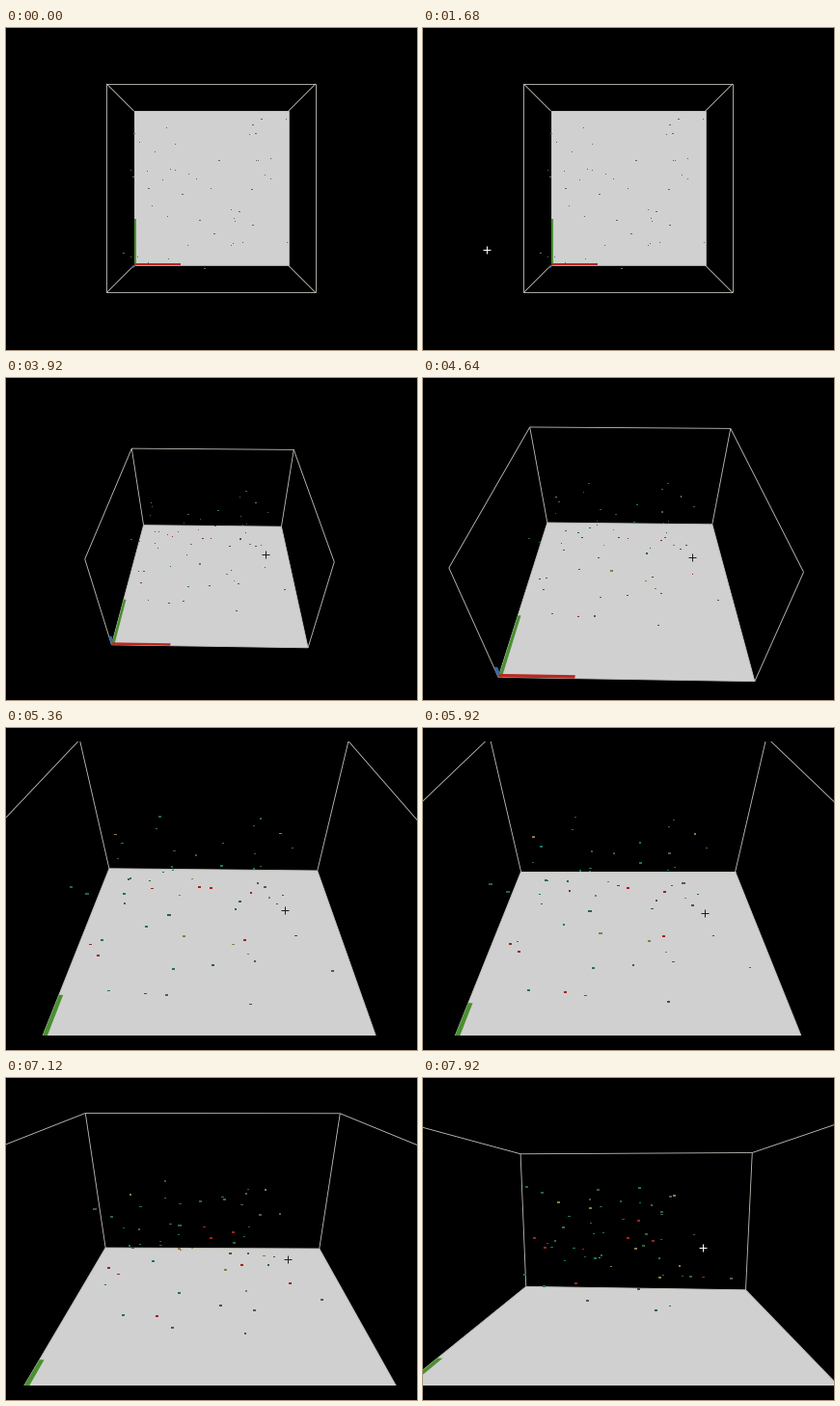
A matplotlib script for the animation above (8000 ms loop, 426 by 334 pixels).

```python
import itertools
import numpy as np
import matplotlib.pyplot as plt
from matplotlib.animation import FuncAnimation
from matplotlib.collections import LineCollection, PolyCollection

W, H = 426, 334
TOP, BOTTOM = 14.3, 319
CX, CY = 212.6, 166.2
FRAMES, STEP = 100, 80
FOCAL = 152.5 / np.tan(np.radians(22.5))
BOX = np.array([1, 1, 0.6])
LID = (2, 1)
DPI = 64
PX = 72 / DPI
COUNT = 56
DRAG_START = 1680

rng = np.random.default_rng(11)
CLOUD = rng.uniform(-.92, .92, (COUNT, 3)) * BOX
DRIFT = rng.normal(0, .06, (COUNT, 3))
HUES = np.array([(.16, .4, .22), (.1, .45, .42), (.6, .15, .12),
                 (.3, .36, .36), (.55, .48, .28)])
COLORS = HUES[rng.integers(len(HUES), size=COUNT)]


def ramp(t, start, end):
    return float(np.clip((t - start) / (end - start), 0, 1))


class Moves:
    """Progress of each hand movement at time t."""
    def __init__(self, t):
        self.lift = ramp(t, 1760, 3360)
        self.sweep = ramp(t, 3520, 3920)
        self.zoom = ramp(t, 3960, 5440)
        self.settle = ramp(t, 5360, 6480)
        self.lower = ramp(t, 6640, 7920)

    def tilt(self):
        return np.radians(50.2 * self.lift + 2.4 * self.settle
                          + 29.4 * self.lower)

    def yaw(self):
        swing = .017 * self.lift - .04 * np.sin(np.pi * self.lift)
        return swing - .034 * self.settle + .071 * self.lower

    def distance(self):
        return 4 - 1.84 * self.zoom

    def pointer(self):
        x = (66 + 6 * self.lift + 197 * self.sweep + 21 * self.zoom
             + 3 * self.settle - 3 * self.lower)
        y = (231 - 50 * self.lift + 3 * self.sweep + 6 * self.zoom
             + 6 * self.settle - 19 * self.lower)
        return round(x) + .5, round(y) - .5


class Camera:
    def __init__(self, moves):
        a, b = moves.tilt(), moves.yaw()
        self.dist = moves.distance()
        sa, ca, sb, cb = np.sin(a), np.cos(a), np.sin(b), np.cos(b)
        self.right = np.array([cb, sb, 0])
        self.up = np.array([-ca * sb, ca * cb, sa])
        self.back = np.array([sa * sb, -sa * cb, ca])
        self.pos = self.back * self.dist

    def scale(self, pts):
        return FOCAL / (self.dist - np.asarray(pts) @ self.back)

    def project(self, pts):
        pts = np.asarray(pts, float)
        s = self.scale(pts)
        return np.column_stack([CX + pts @ self.right * s,
                                CY - pts @ self.up * s])

    def inside(self, face):
        axis, sign = face
        return face != LID and sign * self.pos[axis] < BOX[axis]


def box_edges():
    """Yield both ends of an edge and the two faces (axis, sign) it joins."""
    for axis in range(3):
        u, v = [i for i in range(3) if i != axis]
        for su, sv in itertools.product((-1, 1), repeat=2):
            ends = np.zeros((2, 3))
            ends[:, axis] = -1, 1
            ends[:, u], ends[:, v] = su, sv
            yield ends * BOX, ((u, su), (v, sv))


def strip(axis, length, side, width=.028):
    """Flat bar from the box corner along one axis."""
    along, across = np.eye(3)[axis] * length, np.eye(3)[side] * width
    return -BOX + np.array([0 * along, along, along + across, across])


EDGES = list(box_edges())
FLOOR = strip(0, 2, 1, 2)
BARS = [(strip(2, .15, 0), "#3465a4"), (strip(1, .6, 0), "#4a9030"),
        (strip(0, .6, 1), "#b82820")]

fig = plt.figure(figsize=(W / DPI, H / DPI), dpi=DPI, facecolor="black")
ax = fig.add_axes([0, (H - BOTTOM) / H, 1, (BOTTOM - TOP) / H])
ax.set(xlim=(0, W), ylim=(BOTTOM, TOP))
ax.axis("off")

floor = ax.add_patch(plt.Polygon(FLOOR[:, :2], fc="#d0d0d0", lw=0, zorder=1))
frame_lines = ax.add_collection(
    LineCollection([], colors="#c4c4bc", linewidths=.85 * PX, zorder=2))
bars = ax.add_collection(
    PolyCollection([], fc=[c for _, c in BARS], lw=0, zorder=3))
dots = ax.add_collection(PolyCollection([], lw=0, zorder=4))
cursor = ax.add_collection(
    LineCollection([], linewidths=PX, snap=False, zorder=6))


def slabs(cam, pts):
    """Small flat quads around the given points."""
    scale = cam.scale(pts)
    w = np.maximum(.0075 * scale, .55)
    h = np.maximum(.0045 * scale, .45)
    signs = np.array([(-1, -1), (1, -1), (1, 1), (-1, 1)])
    return (cam.project(pts)[:, None]
            + signs * np.column_stack([w, h])[:, None])


def draw_cloud(cam, t):
    p = ramp(t, DRAG_START, 7920)
    fade = ramp(t, DRAG_START, 4700)
    pts = np.vstack([CLOUD * (1 - .45 * p) + DRIFT * p, np.zeros(3)])
    tint = np.vstack([COLORS, (.75, .08, .12)])
    dots.set_verts(slabs(cam, pts))
    dots.set_facecolor(tint * fade + .4 * (1 - fade))


def draw_cursor(t, moves):
    if t < DRAG_START:
        cursor.set_segments([])
        return
    x, y = moves.pointer()
    cursor.set_segments([[(x - 4, y), (x + 4, y)], [(x, y - 4), (x, y + 4)]])
    over = floor.get_path().contains_point((x, y))
    cursor.set_color("#202020" if over else "white")


def draw(k):
    t = k * STEP
    moves = Moves(t)
    cam = Camera(moves)
    floor.set_xy(cam.project(FLOOR))
    # an edge shows only if one of its faces is seen from inside
    frame_lines.set_segments([cam.project(ends) for ends, faces in EDGES
                              if any(map(cam.inside, faces))])
    bars.set_verts([cam.project(quad) for quad, _ in BARS])
    draw_cloud(cam, t)
    draw_cursor(t, moves)
    return floor, frame_lines, bars, dots, cursor


anim = FuncAnimation(fig, draw, frames=FRAMES, interval=STEP,
                     repeat=True, repeat_delay=0, blit=False)
plt.show()
```
